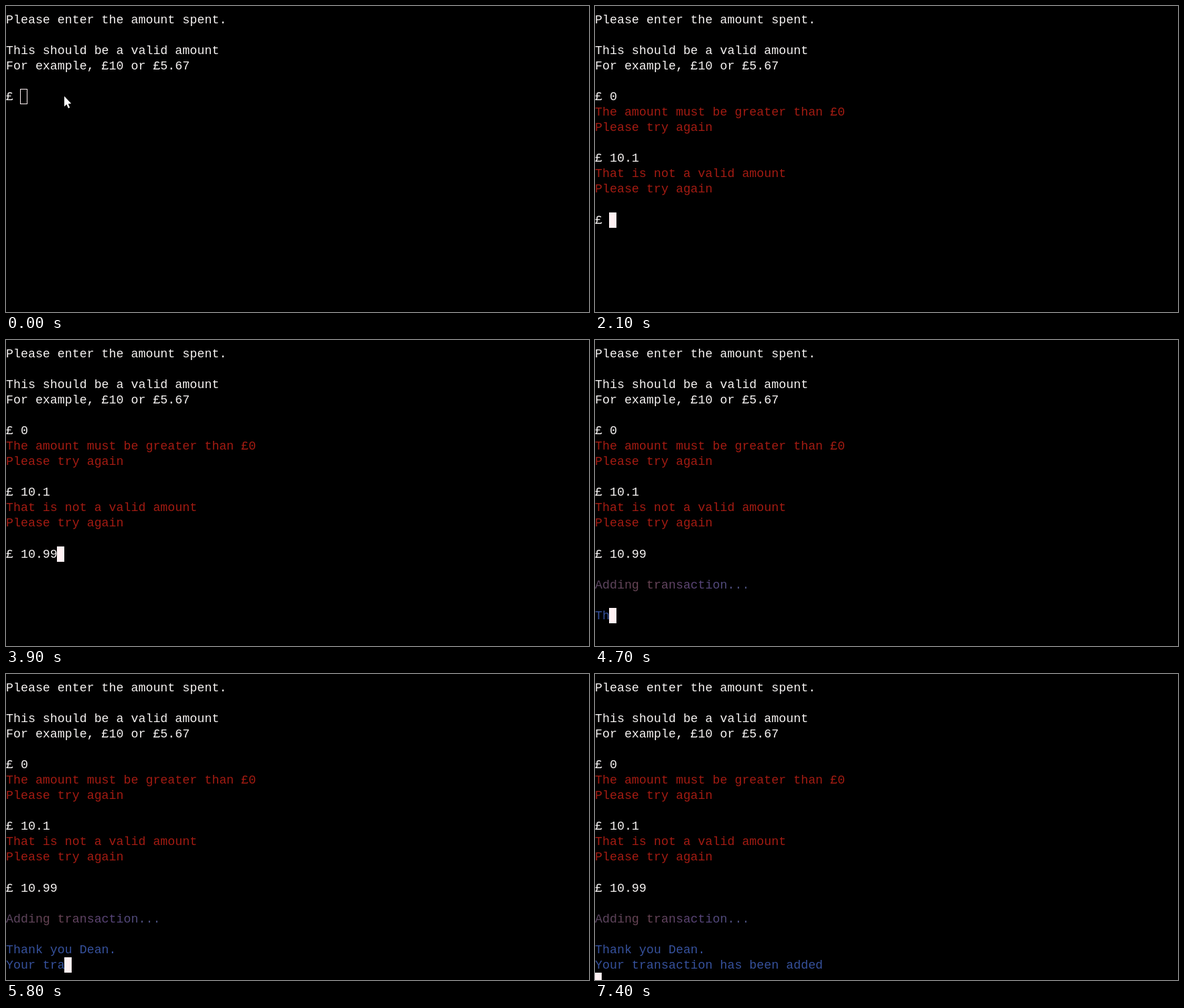
Animation of 870 by 458 pixels, one loop 7.6 s. Source, as an HTML page with a canvas:

```html
<!DOCTYPE html>
<html lang="en">
<head>
<meta charset="utf-8">
<title>Amount prompt</title>
<style>
  html, body { margin: 0; width: 100%; height: 100%; overflow: hidden; background: #000; }
  canvas { display: block; }
</style>
</head>
<body>
<canvas id="stage" width="870" height="458"></canvas>
<script>
const ctx = document.getElementById('stage').getContext('2d');
const LOOP = 7600, STEP = 100;
const CELL = 10.97, LINE = 23.06, TOP = 8.8, ASCENT = 17;
const WHITE = '#f6f3f2', RED = '#a31b12', BLUE = '#36519c', CURSOR = '#fff1f3';

const purple = ctx.createLinearGradient(0, 0, 230, 0);
['#5a4562', '#67424f', '#58447a', '#48507c'].forEach((c, i) => purple.addColorStop(i / 3, c));

const INTRO = [
  'Please enter the amount spent.',
  '',
  'This should be a valid amount',
  'For example, £10 or £5.67'
];
const RETRY = 'Please try again';
const THANKS = 'Thank you Dean.\nYour transaction has been added\n';

// Each entry is [time, characters typed so far].
const SECOND_KEYS = [[700, 1], [800, 2], [1100, 3], [1400, 4]];
const THIRD_KEYS = [[2600, 1], [2700, 2], [3200, 3], [3700, 4], [3900, 5]];

function typed(text, keys, t) {
  let count = 0;
  for (const [time, n] of keys) if (t >= time) count = n;
  return text.slice(0, count);
}

function thanksAt(t) {
  const tick = t >= 5100 && t < 5200 ? 5000 : t;
  return THANKS.slice(0, Math.max(0, (tick - 4600) / 50));
}

function write(text, row, color) {
  ctx.fillStyle = color;
  const y = Math.round(TOP + row * LINE) + ASCENT;
  [...text].forEach((ch, col) => ctx.fillText(ch, col * CELL, y));
}

function drawCursor(col, row, hollow) {
  const x = Math.floor(col * CELL), y = Math.round(TOP + row * LINE);
  if (hollow) {
    ctx.strokeStyle = CURSOR;
    ctx.strokeRect(x + 0.5, y + 0.5, 10, 22);
  } else {
    ctx.fillStyle = CURSOR;
    ctx.fillRect(x, y, col ? 11 : 10, 23);
  }
}

function drawPointer() {
  const outline = [[87, 135], [87, 150.5], [90.4, 147.3], [93, 153],
                   [95.3, 152], [92.8, 146.4], [97.3, 146]];
  ctx.fillStyle = '#fff';
  ctx.beginPath();
  outline.forEach(([x, y]) => ctx.lineTo(x, y));
  ctx.fill();
}

function drawError(message, row) {
  write(message, row, RED);
  write(RETRY, row + 1, RED);
}

function draw(t) {
  ctx.fillStyle = '#000';
  ctx.fillRect(0, 0, 870, 458);
  ctx.font = "18.28px 'Courier New', 'Liberation Mono', monospace";
  ctx.textBaseline = 'alphabetic';
  INTRO.forEach((line, row) => write(line, row, WHITE));

  if (t < 100) {
    write('£', 5, WHITE);
    drawCursor(2, 5, true);
    drawPointer();
    return;
  }

  write('£ 0', 5, WHITE);
  drawError('The amount must be greater than £0', 6);
  const second = '£ ' + typed('10.1', SECOND_KEYS, t);
  write(second, 9, WHITE);
  if (t < 2100) return drawCursor(second.length, 9);

  drawError('That is not a valid amount', 10);
  const third = '£ ' + typed('10.99', THIRD_KEYS, t);
  write(third, 13, WHITE);
  if (t < 4400) return drawCursor(third.length, 13);

  write('Adding transaction...', 15, purple);
  const lines = thanksAt(t).split('\n');
  lines.forEach((line, i) => write(line, 17 + i, BLUE));
  const last = lines.length - 1;
  drawCursor(lines[last].length, 17 + last);
}

const start = performance.now();
function frame() {
  const t = (performance.now() - start) % LOOP;
  draw(Math.floor(t / STEP) * STEP);
  requestAnimationFrame(frame);
}
frame();
</script>
</body>
</html>
```
